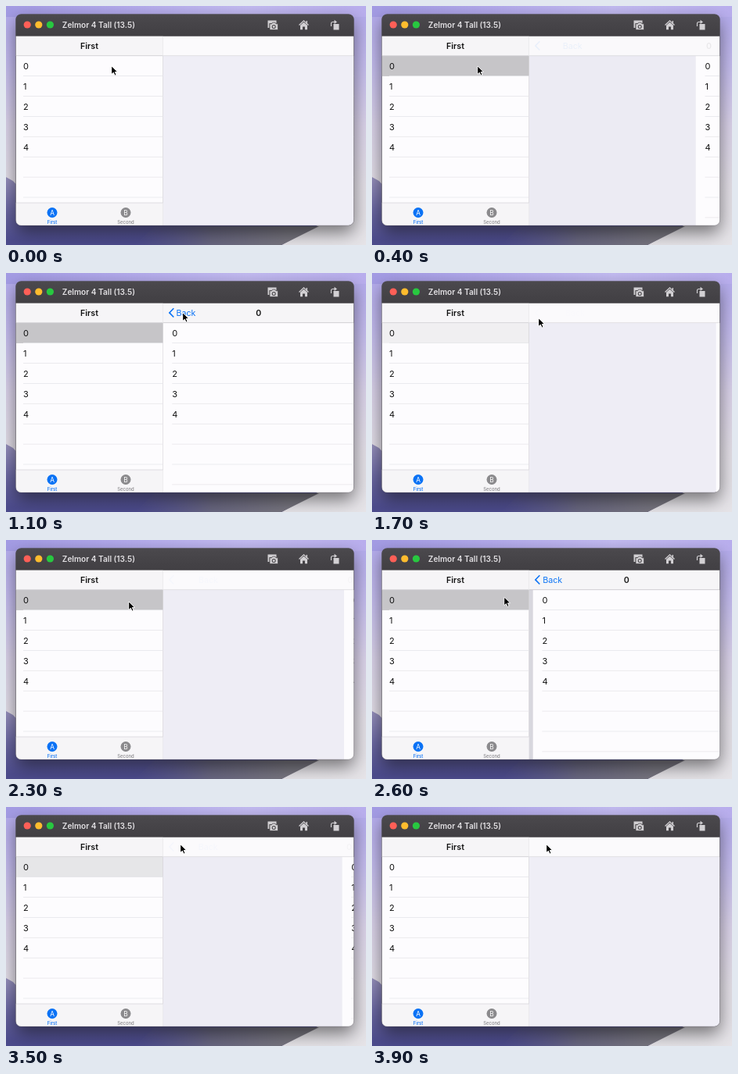
Write an HTML page with a canvas that moves like this. It is 460x306 px and loops after 4 s.

```html
<!DOCTYPE html>
<html lang="en">
<head>
<meta charset="utf-8">
<title>Split view navigation</title>
<style>
  html, body { margin: 0; width: 100%; height: 100%; overflow: hidden; }
  canvas { display: block; }
</style>
</head>
<body>
<canvas id="stage" width="460" height="306"></canvas>
<script>
const ctx = document.getElementById('stage').getContext('2d');
const LOOP = 4000, STEP = 100;
const LEFT = 12.5, SPLIT = 200.5, RIGHT = 444.5, TOP = 10.5, NAV = 38.5, LIST = 64, BOTTOM = 281;
const ROW = 25.9, BLUE = '#0a72f5';
const mix = (a, b, p) => a + (b - a) * p;

function rect(x, y, w, h, fill) {
  ctx.fillStyle = fill;
  ctx.fillRect(x, y, w, h);
}

function shape(d, fill, stroke, width = 1) {
  const path = new Path2D(d);
  if (fill) { ctx.fillStyle = fill; ctx.fill(path); }
  if (stroke) { ctx.strokeStyle = stroke; ctx.lineWidth = width; ctx.stroke(path); }
}

function disc(x, y, r, fill) {
  ctx.fillStyle = fill;
  ctx.beginPath();
  ctx.arc(x, y, r, 0, 7);
  ctx.fill();
}

function text(s, x, y, size, fill = '#111', weight = 400, align = 'left') {
  ctx.font = `${weight} ${size}px Inter, sans-serif`;
  ctx.textAlign = align;
  ctx.fillStyle = fill;
  ctx.fillText(s, x, y);
}

function gradient(x0, y0, x1, y1, ...colors) {
  const g = ctx.createLinearGradient(x0, y0, x1, y1);
  colors.forEach((c, i) => g.addColorStop(i / (colors.length - 1), c));
  return g;
}

// Critically damped spring, from 0 to 1
function spring(ms) {
  const k = Math.max(0, ms) * 0.018;
  return 1 - (1 + k) * Math.exp(-k);
}

// Each visit to the detail page: row pressed, push starts, pop starts
const visits = [[300, 366, 1375], [2200, 2280, 3250]];
const FADE = 430;

const pushed = t => visits.reduce((p, [, push, pop]) => p + spring(t - push) - spring(t - pop), 0);

function highlight(t) {
  const visit = visits.findLast(([press]) => t >= press);
  return visit ? Math.max(0, Math.min(1, 1 - (t - visit[2]) / FADE)) : 0;
}

// Pointer stops: time, x, y
const stops = [
  [0, 135, 77], [500, 135, 77], [1050, 226, 51], [1500, 226, 51], [1700, 213, 58],
  [2150, 157, 79], [2450, 157, 79], [3000, 223, 48], [4000, 223, 48]
];

function pointer(t) {
  const i = stops.findIndex(s => s[0] > t);
  const [a, b] = [stops[i - 1], stops[i]];
  const p = (t - a[0]) / (b[0] - a[0]);
  const e = p * p * (3 - 2 * p);
  return [mix(a[1], b[1], e), mix(a[2], b[2], e)];
}

function wallpaper() {
  rect(0, 0, 460, 306, gradient(0, 0, 0, 306, '#b0a7ea', '#c4bcee', '#dbd3ea', '#e4e0e8', '#e6e4e8'));
  rect(0, 0, 460, 14, gradient(0, 0, 460, 0, '#a39be4', '#b3aaec', '#c3bbf2', '#b9aeee'));
  shape('M0 219L9 224L20 236L200 270L400 280L352 306H0Z',
    gradient(0, 219, 0, 300, '#9791bd', '#6c69a4', '#4c4b8c'));
  shape('M190 282H400L352 306H165Z', gradient(165, 0, 360, 0, 'rgba(96,94,138,0)', '#686680', '#77757f'));
}

function titleBar() {
  rect(LEFT, TOP, RIGHT - LEFT, NAV - TOP, gradient(0, TOP, 0, NAV, '#4b494d', '#413f43'));
  ['#fe5f57', '#febc2e', '#28c840'].forEach((c, i) => disc(27.2 + i * 14.6, 24, 4.6, c));
  text('Zelmor 4 Tall (13.5)', 71.8, 27.6, 10.1, '#e2e0e3', 600);

  const icon = '#d2d0d3', dark = '#454347';
  shape('M334.5 18.5H345.5V22H334.5ZM334.5 18.5H336.5V28H334.5Z', icon);
  shape('M337 22.8H339.5L340.5 21.2H344L345 22.8H347.5V30.5H337Z', icon, dark, .7);
  disc(342.2, 26.6, 2.5, dark);
  disc(342.2, 26.6, 1.5, icon);
  shape('M374.5 24.5L380.5 18.8L386.5 24.5', null, icon, 1.3);
  shape('M376 24.8L380.5 20.8L385 24.8V30.3H382V26.5H379V30.3H376ZM383.6 19H385V23H383.6Z', icon);
  shape('M418.5 23H425.5V30.5H418.5Z', icon);
  shape('M415.5 26V22.5Q415.5 20.5 417.5 20.5H420', null, icon, 1.2);
  shape('M419.5 17.8L423 20.5L419.5 23Z', icon);
}

function rows(x, right, count) {
  for (let i = 0; i < count; i++) {
    if (i < 5) text(i, x, 80.9 + i * ROW, 11);
    rect(x, 89.2 + i * ROW, right - x, .8, '#e7e6ea');
  }
}

function tab(x, letter, label, color) {
  disc(x, 264.5, 6.5, color);
  text(letter, x, 267.5, 8.3, '#fff', 400, 'center');
  text(label, x, 278.9, 5.9, color, 500, 'center');
}

function master(selected) {
  rect(LEFT, NAV, SPLIT - LEFT, BOTTOM - NAV, '#fdfcfe');
  rect(LEFT, LIST, SPLIT - LEFT, ROW, `rgba(198,197,200,${selected})`);
  rows(22, SPLIT, 7);
  rect(LEFT, NAV, SPLIT - LEFT, LIST - NAV, '#f6f5f7');
  rect(LEFT, LIST - .7, SPLIT - LEFT, .8, '#cfced2');
  text('First', 106.5, 54.6, 10.6, '#111', 600, 'center');
  rect(LEFT, 252, SPLIT - LEFT, BOTTOM - 252, '#f6f5f7');
  rect(LEFT, 251.6, SPLIT - LEFT, .8, '#d6d5d9');
  tab(59, 'A', 'First', BLUE);
  tab(153, 'B', 'Second', '#8b8a8d');
}

function detail(p) {
  const width = RIGHT - SPLIT, page = mix(RIGHT, SPLIT, p);
  rect(SPLIT, LIST, width, BOTTOM - LIST, '#efeef6');
  rect(SPLIT, LIST, width, BOTTOM - LIST, `rgba(0,0,0,${.1 * p})`);
  rect(page, LIST, width, BOTTOM - LIST, '#fdfcfe');
  rows(page + 11.7, RIGHT, 8);

  const tone = mix(251, 246, p);
  rect(SPLIT, NAV, width, LIST - NAV, `rgb(${tone},${tone - 1},${tone + 1})`);
  rect(SPLIT, LIST - .7, width, .8, `rgba(190,189,194,${mix(.5, .8, p)})`);
  ctx.globalAlpha = p * Math.min(1, .4 + p);
  shape('M214.3 45.3L208.8 50.9L214.3 56.5', null, BLUE, 1.6);
  text('Back', mix(247.5, 217.5, p), 54.8, 10.7, BLUE);
  text('0', mix(446, 322.7, p), 54.6, 10.6, '#111', 600, 'center');
  ctx.globalAlpha = 1;
  rect(SPLIT - .4, NAV, .8, BOTTOM - NAV, '#d0cfd4');
}

function cursor(x, y) {
  ctx.save();
  ctx.translate(x, y);
  shape('M0 0V10.2L2.4 8L4.2 12L5.9 11.2L4.2 7.4H7.3Z', '#000', '#fff', 1);
  shape('M.3 .8V9.4L2.5 7.3L4.4 11.3L5.2 10.9L3.4 6.9H6.4Z', '#000');
  ctx.restore();
}

function draw(t) {
  const frame = new Path2D();
  frame.roundRect(LEFT, TOP, RIGHT - LEFT, BOTTOM - TOP, 7);

  wallpaper();
  ctx.save();
  ctx.shadowColor = 'rgba(0,0,0,.5)';
  ctx.shadowBlur = 22;
  ctx.shadowOffsetY = 9;
  ctx.fillStyle = '#454347';
  ctx.fill(frame);
  ctx.restore();

  ctx.save();
  ctx.clip(frame);
  detail(pushed(t));
  master(highlight(t));
  titleBar();
  ctx.restore();
  ctx.strokeStyle = 'rgba(90,88,96,.45)';
  ctx.lineWidth = .7;
  ctx.stroke(frame);
  cursor(...pointer(t));
}

const start = performance.now();
function tick() {
  const t = (performance.now() - start) % LOOP;
  draw(Math.floor(t / STEP) * STEP);
  requestAnimationFrame(tick);
}
tick();
</script>
</body>
</html>
```
